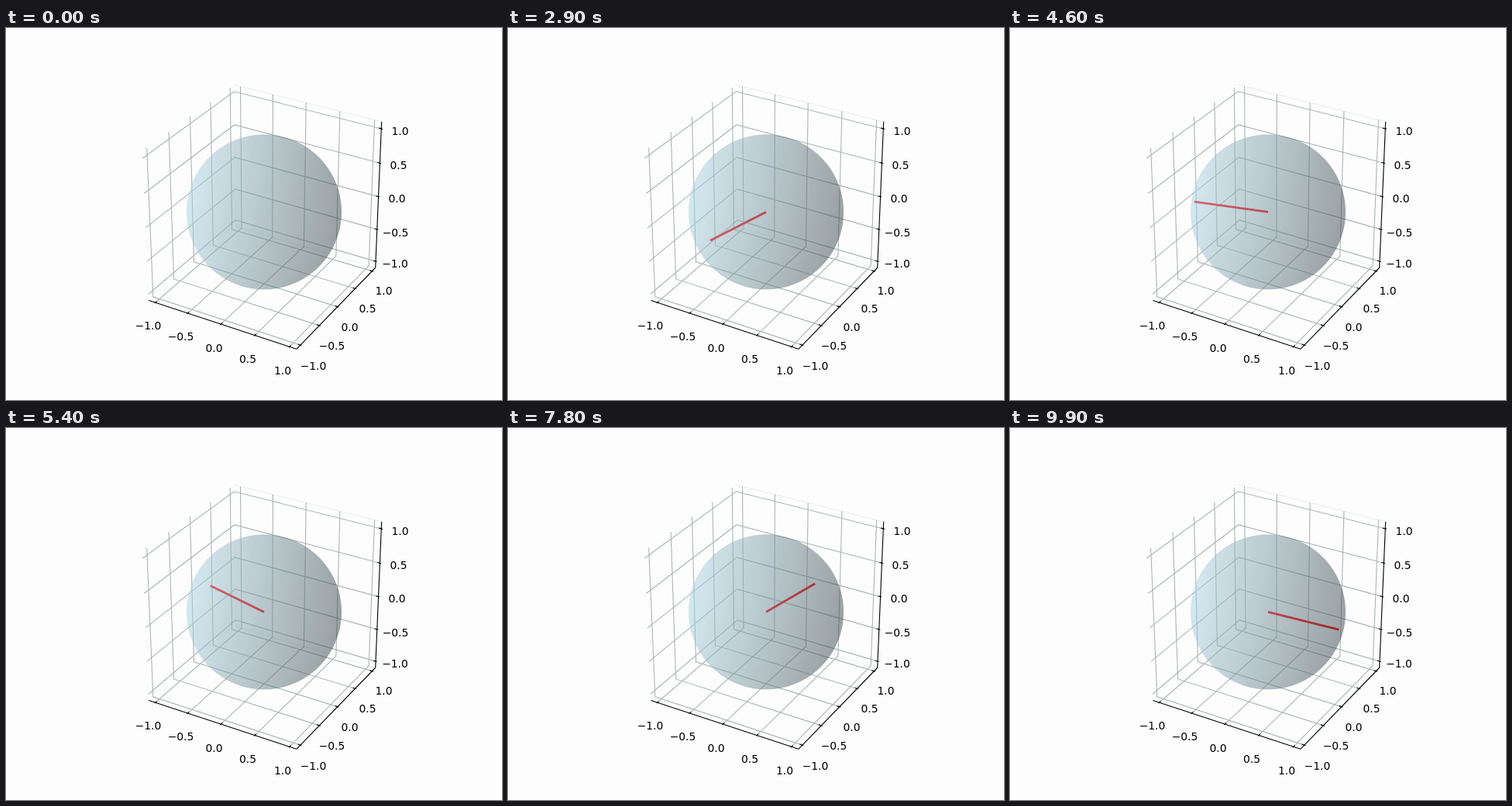
Write an HTML page with a canvas that moves like this. It is 640 px wide and 480 px high and loops after 10 s.

```html
<!DOCTYPE html>
<html lang="en">
<head>
<meta charset="utf-8">
<title>Rotating radius in a sphere</title>
<style>
html, body { margin: 0; width: 640px; height: 480px; overflow: hidden; background: #fdfdfd; }
canvas { display: block; }
</style>
</head>
<body>
<canvas id="stage" width="640" height="480"></canvas>
<script>
const W = 640, H = 480, CX = 333, CY = 237.4, R = 100;
const EDGE = 1.1, TICKS = [-1, -0.5, 0, 0.5, 1];

// Perspective camera at elevation 30°, azimuth -60°, distance 10.
function project([x, y, z]) {
  const scale = 999.2 / (10 - 0.5 * (0.433 * x - 0.75 * y + 0.5 * z));
  return [
    CX + scale * (0.866 * x + 0.5 * y),
    CY - scale * (-0.25 * x + 0.433 * y + 0.866 * z)
  ];
}

function line(ctx, color, width, ...points) {
  ctx.strokeStyle = color;
  ctx.lineWidth = width;
  ctx.beginPath();
  points.forEach(p => ctx.lineTo(...project(p)));
  ctx.stroke();
}

function layer(paint) {
  const canvas = document.createElement("canvas");
  canvas.width = W;
  canvas.height = H;
  paint(canvas.getContext("2d"));
  return canvas;
}

// Label centres, from -1 to 1 on each axis.
const LABELS = [
  [[183.5, 384], [225.5, 398], [268.5, 413], [312, 427], [357, 442]],
  [[396.5, 436], [420.5, 410], [443.5, 386], [466.5, 362], [487.5, 339]],
  [[502, 303.5], [502.5, 263.5], [504.5, 220], [506.5, 177], [508.5, 133]]
];

const axes = layer(ctx => {
  const e = EDGE, out = e + 0.018, inn = e - 0.036;
  ctx.fillStyle = "#fdfdfd";
  ctx.fillRect(0, 0, W, H);

  line(ctx, "#e9ecec", 1, [-e, e, e], [e, e, e]);
  line(ctx, "#eef0f0", 1, [-e, e, -e], [e, e, -e]);
  for (const t of TICKS) {
    line(ctx, "#adb5b6", 1.11, [t, e, e], [t, e, -e], [t, -e, -e]);
    line(ctx, "#adb5b6", 1.11, [-e, t, e], [-e, t, -e], [e, t, -e]);
    line(ctx, "#adb5b6", 1.11, [-e, -e, t], [-e, e, t], [e, e, t]);
  }

  line(ctx, "#000", 1.11, [-e, -e, -e], [e, -e, -e]);
  line(ctx, "#000", 1.11, [e, -e, -e], [e, e, -e]);
  line(ctx, "#000", 1.11, [e, e, -e], [e, e, e]);
  for (const t of TICKS) {
    line(ctx, "#000", 1.11, [t, -inn, -e], [t, -out, -e]);
    line(ctx, "#000", 1.11, [inn, t, -e], [out, t, -e]);
    line(ctx, "#000", 1.11, [inn, e, t], [out, e, t]);
  }

  ctx.fillStyle = "#000";
  ctx.font = '13.89px "DejaVu Sans", sans-serif';
  ctx.textAlign = "center";
  for (const row of LABELS) {
    row.forEach(([x, y], i) => {
      ctx.fillText(TICKS[i].toFixed(1).replace("-", "\u2212"), x, y + 5);
    });
  }
});

// Two translucent light-blue shells, far and near, lit from the left.
const sphere = layer(ctx => {
  const image = ctx.createImageData(W, H), near = 0.3, far = 0.21, alpha = near + far;
  for (let py = 0; py < H; py++) {
    for (let px = 0; px < W; px++) {
      const x = (px + 0.5 - CX) / R, y = (CY - py - 0.5) / R, r = Math.hypot(x, y);
      const cover = Math.min(1, (1 - r) * R + 0.5);
      if (cover <= 0) continue;
      const z = Math.sqrt(Math.max(0, 1 - r * r));
      const side = -0.911 * x + 0.167 * y, depth = 0.378 * z;
      const shade = 0.65 + 0.35 * (side + depth * (near - far) / alpha);
      image.data.set(
        [173 * shade, 216 * shade, 230 * shade, 255 * alpha * cover],
        4 * (py * W + px)
      );
    }
  }
  ctx.putImageData(image, 0, 0);
});

const stage = document.getElementById("stage").getContext("2d");

function draw() {
  const step = Math.floor(performance.now() / 100) % 100;
  const angle = -2 * Math.PI * step / 100;
  stage.drawImage(axes, 0, 0);
  if (step) line(stage, "#f00", 2.78, [0, 0, 0], [Math.cos(angle), Math.sin(angle), 0]);
  stage.drawImage(sphere, 0, 0);
  requestAnimationFrame(draw);
}
draw();
</script>
</body>
</html>
```
